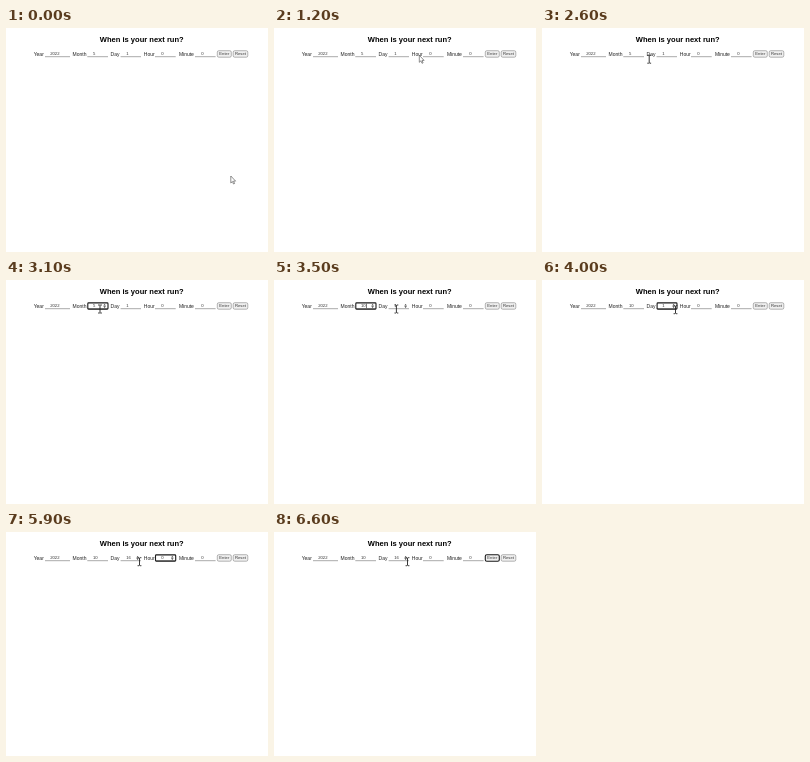
Write an HTML page that moves like this. It is 262x224 px and loops after 8000 ms.

```html
<!DOCTYPE html>
<html lang="en">
<head>
<meta charset="utf-8">
<title>Next run</title>
<style>
html, body { margin: 0; width: 100%; height: 100%; overflow: hidden; background: #fff; }
svg { display: block; width: 262px; height: 224px; }
text { font-family: "Liberation Sans", Arial, sans-serif; font-size: 5px; fill: #222; }
.title { font-size: 7.55px; font-weight: bold; fill: #000; }
.small { font-size: 4.2px; fill: #333; }
.line { stroke: #949494; stroke-width: .8; }
.ring { fill: none; stroke: #1a1a1a; stroke-width: 1.1; }
.button { fill: #efefef; stroke: #858585; stroke-width: .6; }
.button.on { stroke: #1a1a1a; stroke-width: 1.1; }
</style>
</head>
<body>
<svg id="stage" viewBox="0 0 262 224">
  <text class="title" x="93.8" y="14">When is your next run?</text>
</svg>
<script>
const LOOP = 8000, STEP = 100;
const stage = document.getElementById("stage");

function add(tag, attrs, parent = stage, text = "") {
  const el = document.createElementNS("http://www.w3.org/2000/svg", tag);
  for (const k in attrs) el.setAttribute(k, attrs[k]);
  el.textContent = text;
  parent.append(el);
  return el;
}

const show = (el, on) => el.setAttribute("visibility", on ? "visible" : "hidden");

function addField(label, labelX, left, right, textX) {
  add("text", { x: labelX, y: 27.6 }, stage, label);
  add("line", { class: "line", x1: left, x2: right, y1: 28.7, y2: 28.7 });
  const value = add("text", { class: "small", x: textX, y: 27.4 });
  const spin = add("path", {
    d: `M${right - 4.7} 25.5l1.3-1.6 1.3 1.6zM${right - 4.7} 26.3l1.3 1.6 1.3-1.6z`, fill: "#444"
  });
  const caret = add("rect", { y: 23.7, width: .6, height: 4.4, fill: "#222" });
  const ring = add("rect", {
    class: "ring", x: left + .5, y: 22.9, width: right - left - .5, height: 6.2, rx: .8
  });
  return { value, spin, caret, ring, textX, left, right };
}

function addButton(label, x, width, textX) {
  const box = add("rect", { class: "button", x, y: 22.7, width, height: 6.5, rx: 1.5 });
  add("text", { class: "small", x: textX, y: 27.4 }, stage, label);
  return box;
}

const fields = {
  year: addField("Year", 27.7, 39, 64, 44.2),
  month: addField("Month", 66.6, 81.3, 102, 87),
  day: addField("Day", 104.6, 114.6, 135, 120.2),
  hour: addField("Hour", 137.8, 149, 169.7, 155.2),
  minute: addField("Minute", 172.9, 189, 209.6, 195.2)
};
const enter = addButton("Enter", 211.3, 14, 213.3);
addButton("Reset", 227.2, 14.6, 229);

const arrow = add("path", {
  d: "M0 0V7L1.6 5.5 2.7 8 3.8 7.5 2.7 5.1H4.8Z",
  fill: "#fff", stroke: "#444", "stroke-width": .6, "stroke-linejoin": "round"
});
const beam = add("path", {
  d: "M-1.9 0H-.6L0 .5 .6 0H1.9M-1.9 8H-.6L0 7.5 .6 8H1.9M0 .5V7.5",
  fill: "none", stroke: "#222", "stroke-width": .9
});

// Steps: [time, value]
const texts = {
  year: [[0, "2022"]],
  month: [[0, "5"], [3200, "1"], [3300, "10"]],
  day: [[0, "1"], [4600, "16"]],
  hour: [[0, "0"]],
  minute: [[0, "0"]]
};
const focus = [[0, ""], [3100, "month"], [3900, "day"], [5700, "hour"], [6100, "minute"], [6500, "enter"]];
const pointer = [[0, "arrow"], [2300, "beam"]];

// Pointer path: [time, x, y]
const path = [
  [0, 224.8, 148], [900, 224.8, 148], [1000, 215, 124], [1100, 180, 70],
  [1200, 145.3, 27.3], [1500, 112, 25.5], [1700, 101.6, 24.8], [1900, 101.6, 24.8],
  [2200, 104, 26.5], [2600, 107.2, 27.2], [2900, 107.2, 27.2], [3100, 94, 25],
  [3300, 104, 25], [3500, 122.4, 25], [3800, 133.5, 25.7], [LOOP, 133.5, 25.7]
];

const at = (steps, t) => steps.filter(s => s[0] <= t).pop()[1];

function place(t) {
  const i = path.findIndex(p => p[0] > t);
  const [a, b] = [path[i - 1], path[i]];
  const k = (t - a[0]) / (b[0] - a[0]);
  return [a[1] + (b[1] - a[1]) * k, a[2] + (b[2] - a[2]) * k];
}

function draw(time) {
  const t = Math.floor((time % LOOP) / STEP) * STEP;
  const active = at(focus, t), kind = at(pointer, t), [x, y] = place(t);
  for (const name in fields) {
    const f = fields[name], text = at(texts[name], t), on = name === active;
    const hover = kind === "beam" && x > f.left && x < f.right && y < 29;
    f.value.textContent = text;
    show(f.ring, on);
    show(f.spin, on || hover);
    show(f.caret, on && t % 1000 >= 200 && t % 1000 < 700);
    f.caret.setAttribute("x", f.textX + text.length * 2.34 + .4);
  }
  enter.classList.toggle("on", active === "enter");
  show(arrow, kind === "arrow");
  show(beam, kind === "beam");
  for (const el of [arrow, beam]) el.setAttribute("transform", `translate(${x} ${y})`);
}

const start = performance.now();
function tick() {
  draw(performance.now() - start);
  requestAnimationFrame(tick);
}
tick();
</script>
</body>
</html>
```
